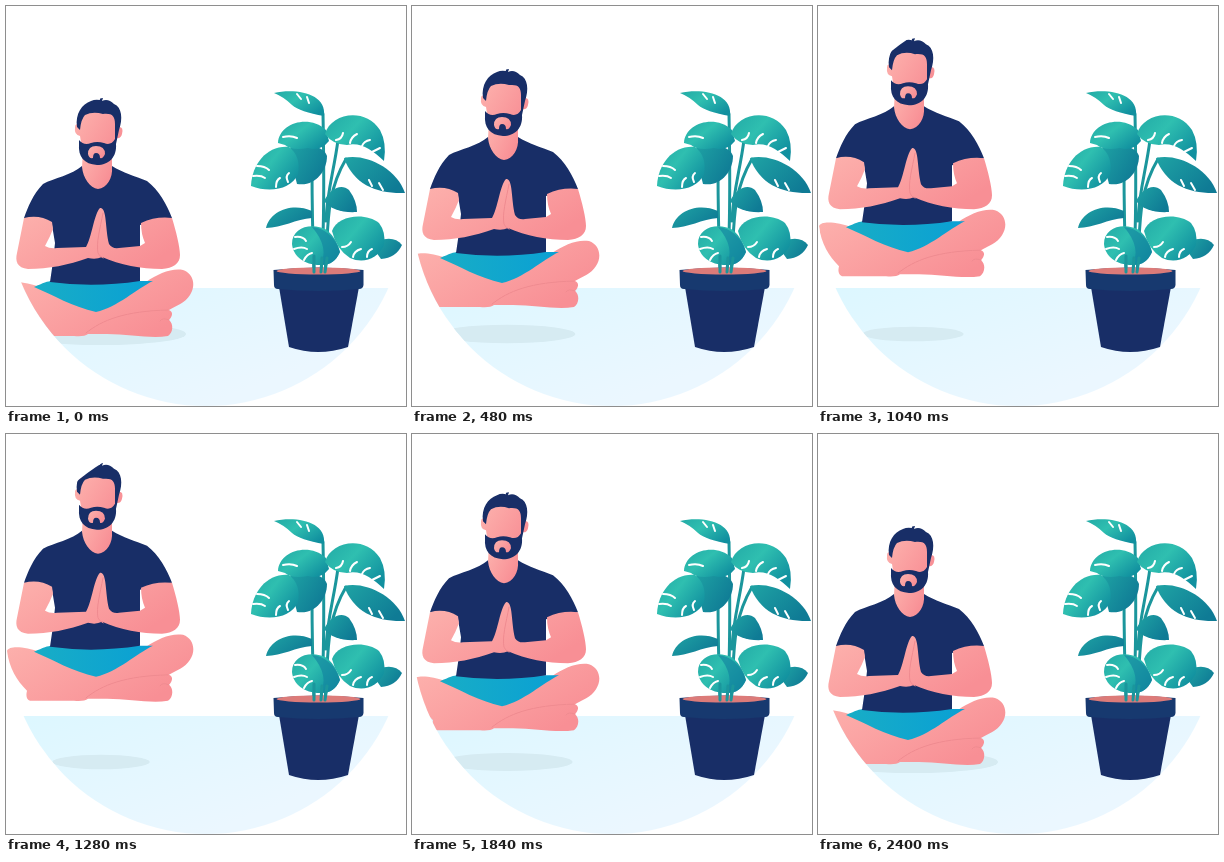
These frames come from a looping animation (400x400 px, 2640 ms). An HTML page:

```html
<!DOCTYPE html>
<html lang="en">
<head>
<meta charset="utf-8">
<title>Levitating meditation</title>
<style>
  html, body { margin: 0; width: 100%; height: 100%; overflow: hidden; background: #fff; }
  svg { display: block; width: 100%; height: 100%; }
  .navy { fill: #182e67; }
  .skin { fill: url(#skin); }
  .notch { fill: none; stroke: #fff; stroke-width: 2; stroke-linecap: round; }
  .crease { fill: none; stroke: #ef8b90; stroke-width: 1; stroke-linecap: round; }
  .stem { fill: none; stroke: #1b969c; stroke-width: 3; stroke-linecap: round; }
</style>
</head>
<body>
<svg viewBox="0 0 400 400">
  <defs>
    <clipPath id="disc"><circle cx="200" cy="200" r="200"/></clipPath>
    <linearGradient id="floor" x2=".8" y2=".6">
      <stop stop-color="#dcf7ff"/><stop offset="1" stop-color="#ebf7ff"/>
    </linearGradient>
    <linearGradient id="skin" x2="1" y2=".6">
      <stop stop-color="#fdb3ae"/><stop offset="1" stop-color="#f88f95"/>
    </linearGradient>
    <linearGradient id="shorts" x2="1">
      <stop stop-color="#18adc6"/><stop offset="1" stop-color="#0aa0d4"/>
    </linearGradient>
    <linearGradient id="leaf" x2="1" y2=".7">
      <stop stop-color="#22aaa6"/><stop offset=".45" stop-color="#2fbfb0"/><stop offset="1" stop-color="#11909f"/>
    </linearGradient>
    <linearGradient id="shade" x2="1" y2=".6">
      <stop stop-color="#1fa3a4"/><stop offset="1" stop-color="#0f7b95"/>
    </linearGradient>
  </defs>

  <g clip-path="url(#disc)">
    <rect y="282" width="400" height="118" fill="url(#floor)"/>
    <ellipse id="shadow" cx="95" cy="328" fill="#d6ebf2"/>

    <g id="man">
      <!-- legs and shorts -->
      <path class="skin" d="M1 280C3 274 20 276 34 281L92 300L140 276C152 268 165 262 177 264C188 268 190 280 184 289C179 297 170 300 163 304C168 306 166 311 163 314C168 318 167 327 162 330C145 333 123 328 101 328L82 328Q78 331 68 330H24Q19 328 21 320C11 310 3 297 1 280Z"/>
      <path fill="url(#shorts)" d="M28 281C37 277 42 275 46 275H134L147 275C130 283 112 301 90 306C67 301 47 289 28 281Z"/>
      <path class="crease" d="M80 327C96 314 119 305 162 304M163 314Q156 311 154 315"/>

      <!-- neck and torso -->
      <path class="navy" d="M76 160C66 169 48 172 37 178C27 188 22 201 18 212L46 219L49 237Q47 258 44 276Q88 282 134 275V219L166 212C161 199 153 184 141 175C129 170 117 167 106 160Z"/>
      <path class="skin" d="M77 144H106V161C107 172 101 182 92 183C84 182 77 172 76 161Z"/>

      <!-- arms and hands -->
      <path class="skin" d="M18 212Q33 208 46 216L47 223Q44 231 39 240Q44 243 51 242L80 241C86 231 88 208 94 202C101 201 99 222 103 238Q106 243 113 242L134 240L139 237Q135 228 135 217Q150 210 166 212C170 225 174 241 174 249C174 258 167 262 156 263C135 263 114 259 96 251Q90 254 82 252C62 259 43 263 22 263C11 262 9 255 11 247Z"/>
      <path class="crease" d="M97 207C94 223 90 237 92 247Q93 250 97 252"/>

      <!-- head -->
      <path class="skin" d="M73 107Q91 99 112 109V121Q118 120 116 128Q115 133 110 132L106 150H77L74 130Q68 129 69 121Q69 117 73 119Z"/>
      <path class="navy" d="M71 121C69 108 76 98 85 95Q89 93 94 94Q93 92 97 92L96 95Q102 92 108 98C116 101 117 113 113 124L110 138C111 151 103 159 91 159C78 158 72 151 73 138V134Q78 140 85 137Q91 135 98 137Q105 140 109 133V118C109 110 106 107 97 108Q87 105 79 109Q75 113 74 124Z"/>
      <path class="skin" d="M82 148Q82 140 90 140Q99 140 99 148Q97 153 94 152Q94 147 90 147Q87 147 87 152Q83 153 82 148Z"/>
    </g>
  </g>

  <!-- plant -->
  <path class="stem" d="M308 266Q306 215 306 160M315 266C319 220 318 160 317 108M320 215C321 185 328 165 332 134M319 266C323 225 318 190 340 153"/>
  <g fill="url(#shade)">
    <path d="M282 143C300 136 318 140 321 150C321 165 309 181 291 178Z"/>
    <path d="M338 152C358 147 390 161 399 187C371 188 348 179 338 152Z"/>
    <path d="M318 195C324 183 335 177 343 184Q351 195 351 206C336 207 324 203 318 195Z"/>
    <path d="M260 222C264 205 286 196 306 205V212C290 213 276 222 260 222Z"/>
    <path d="M372 235Q388 229 396 239Q390 252 375 253L370 246Z"/>
  </g>
  <g fill="url(#leaf)">
    <path d="M268 87C291 82 321 88 318 110Q294 106 286 99Q278 91 268 87Z"/>
    <path d="M272 137C273 117 303 108 320 124L323 135Q314 146 302 142Q286 145 279 139Z"/>
    <path d="M319 128C325 107 359 101 374 124Q381 137 378 155C366 144 355 136 341 139Q327 139 319 128Z"/>
    <path d="M245 180C246 157 262 139 283 141Q295 150 292 168C285 184 263 187 245 180Z"/>
    <path d="M326 225C331 209 360 206 373 217Q380 226 378 239C372 253 357 258 344 252Q330 243 326 225Z"/>
    <path d="M286 238C286 221 306 216 321 224Q331 233 334 246Q328 260 314 259C298 259 287 250 286 238Z"/>
  </g>
  <path fill="#1385a0" opacity=".65" d="M306 221Q326 223 334 246Q328 260 314 259Q324 242 306 221Z"/>
  <path class="notch" d="M291 88l4 5M301 91l2 6M277 131q8-2 14 1M330 134q6-1 7-7M344 137q1-6 7-9M356 140q2-5 8-6M366 146l8-4M251 160q8 0 12 4M247 170q8-1 12 2M270 181q0-7 4-9M282 176q-3-6 1-9M366 180l-3-6M377 184l-4-7M336 241q6 0 9-5M347 251q1-6 8-8M361 251q0-6 5-8M289 231q8-1 11 4M288 243q8-3 13 0M298 254q3-6 8-7"/>

  <!-- pot -->
  <path class="navy" d="M273 281L283 341Q312 351 342 341L353 281Z"/>
  <path fill="#17396f" d="M267.500 264Q312 259 357.500 264V279Q357 283 353 283Q312 287 272 283Q268 283 268 279Z"/>
  <ellipse cx="312.500" cy="265" rx="42" ry="3.500" fill="#dc7b79"/>
  <path class="stem" d="M308 266V250M315 266L316 252M319 266L321 252"/>
</svg>
<script>
  const LOOP = 2640, RISE = 1200, STEP = 40, HEIGHT = 66;
  const man = document.getElementById('man');
  const shadow = document.getElementById('shadow');

  // Steady lift-off that slows toward the top.
  const ease = u => u + 0.4 * u * u * (1 - u);

  function draw(now) {
    const time = Math.floor(now % LOOP / STEP) * STEP;
    const lift = ease(Math.max(0, 1 - Math.abs(time - RISE) / RISE));
    man.setAttribute('transform', `translate(0 ${-HEIGHT * lift})`);
    shadow.setAttribute('rx', 85 - 38 * lift);
    shadow.setAttribute('ry', 11 - 4 * lift);
    requestAnimationFrame(draw);
  }
  draw(0);
</script>
</body>
</html>
```
